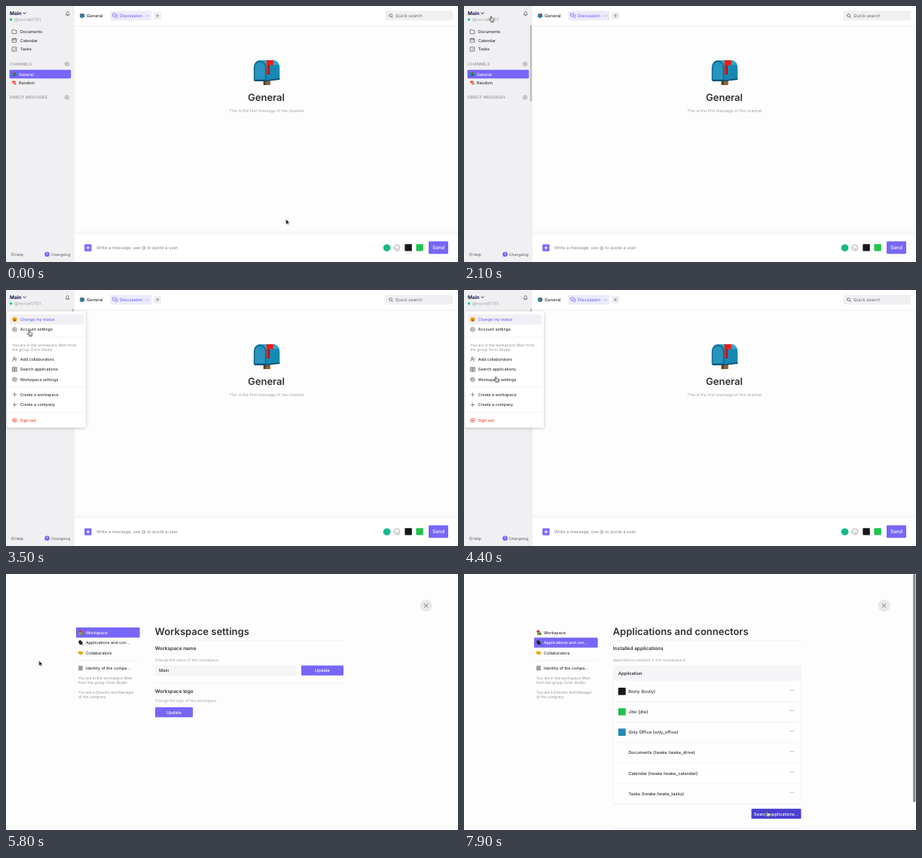
An HTML page that plays this animation: 600 by 340 pixels, repeating every 8000 ms.

```html
<!DOCTYPE html>
<html lang="en">
<head>
<meta charset="utf-8">
<title>Workspace chat</title>
<style>
html, body { margin: 0; width: 100%; height: 100%; overflow: hidden; background: #fdfdfd; }
svg { display: block; width: 600px; height: 340px; }
text { font-family: Inter, sans-serif; text-rendering: geometricPrecision; white-space: pre; }
.line { fill: none; stroke-width: .7; stroke-linecap: round; stroke-linejoin: round; }
</style>
</head>
<body>
<svg id="stage" viewBox="0 0 600 340"></svg>
<script>
const LOOP = 8000;
const INK = '#333338', GREY = '#929297', PURPLE = '#7866f8', RED = '#e8402f';
const S = 5.33, M = 5.75; // small and medium text sizes

// Text is placed by its vertical centre.
const text = (x, y, str, { size = S, fill = INK, weight = 500, anchor = 'start' } = {}) =>
  `<text x="${x}" y="${(y + size * .36).toFixed(2)}" font-size="${size}" fill="${fill}" font-weight="${weight}" text-anchor="${anchor}">${str}</text>`;
const rect = (x, y, w, h, fill, r = 0, more = '') =>
  `<rect x="${x}" y="${y}" width="${w}" height="${h}" rx="${r}" fill="${fill}" ${more}/>`;
const dot = (x, y, r, fill) => `<circle cx="${x}" cy="${y}" r="${r}" fill="${fill}"/>`;
const line = (d, stroke = INK, more = '') => `<path class="line" d="${d}" stroke="${stroke}" ${more}/>`;
const rule = (x, y, w, c = '#ececee') => rect(x, y, w, .6, c);
const ring = (x, y, r) => `M${x - r} ${y}a${r} ${r} 0 1 0 ${2 * r} 0a${r} ${r} 0 1 0 ${-2 * r} 0`;
const plus = (x, y, r) => `M${x - r} ${y}h${2 * r}M${x} ${y - r}v${2 * r}`;
const dots = (x, y, fill) => [-2, 0, 2].map(d => dot(x + d, y, .5, fill)).join('');
const group = (id, body, more = '') => `<g id="${id}" ${more}>${body}</g>`;
const at = (x, y, body, k = 1) => `<g transform="translate(${x} ${y}) scale(${k})">${body}</g>`;

const mailbox = `
  <path d="M13 24h9v11h-9z" fill="#8a6238"/><path d="M13 24h3v11h-3z" fill="#5d3d20"/>
  <path d="M8 2H27Q34.500 4 34.500 13V27L17 29.500H1V12Q1 2 8 2Z" fill="#1688b4"/>
  <path d="M8 2H27Q32 3 33.500 8L16 9Q13 3 8 2Z" fill="#35a8cf"/>
  <path d="M0 12Q0 3 8.500 3Q16.500 3 16.500 12V29H0Z" fill="#12668d"/>
  <path d="M1.500 12Q1.500 4.500 8.500 4.500Q15 4.500 15 12V27.500H1.500Z" fill="#2795bd"/>
  <path d="M1 28.500H17L34.500 26V28L17 30H1Z" fill="#0d4f70"/>
  <path d="M17 2H26V8.500H21V21H17Z" fill="#f01c14"/><path d="M21 8.500V21H19.500V8Z" fill="#a80f0b"/>`;
const mini = (x, y) => at(x, y, mailbox, .18);

const gear = (x, y) => line(ring(x, y, 2.8) + ring(x, y, 1.1), '#55555c');
const smile = (x, y) => dot(x, y, 3.3, '#f9b62c') + dot(x - 1.1, y - .8, .5, '#533') + dot(x + 1.1, y - .8, .5, '#533') +
  `<path d="M${x - 1.9} ${y + .4}h3.800q-.3 2-1.900 2t-1.900-2z" fill="#a33a20"/>`;

const sidebar = () => {
  const nav = ['Documents', 'Calendar', 'Tasks'].map((s, i) => text(19, 34 + i * 11.7, s)).join('');
  const add = y => line(ring(81, y, 2.7) + plus(81, y, 1.3), GREY);
  return rect(0, 0, 91, 340, '#f0f0f2') +
    text(5, 9.5, 'Main', { size: 6.5, weight: 700, fill: '#19194f' }) + line('M23 8.900l1.600 1.600l1.600-1.600', '#19194f', 'style="stroke-width:1"') +
    line('M79.500 11.500q.7-.6.7-2.200q0-1.800 1.500-1.800t1.500 1.800q0 1.600.7 2.200zM81 12.700h1.300', '#55555c') +
    dot(6.6, 18, 1.8, '#1fc99a') + text(11, 18.2, '@norvell7151', { size: M, fill: '#a2a2a7', weight: 400 }) + nav +
    line('M8.500 31.500h2.200l.8 1h2.500v4.200h-5.500z', '#55555c') +
    line('M8.500 43.500h5.400v4.700h-5.400zM8.500 45h5.400M10 42.600v1M12.400 42.600v1', '#55555c') +
    line('M8.500 54.700h5.400v5.400h-5.400zM9.900 57.400l1 1l1.700-1.900', '#55555c') +
    text(5, 77, 'CHANNELS', { fill: GREY }) + add(77) +
    rect(4.5, 84.8, 81.7, 11.4, PURPLE, 1.3) + mini(7.8, 87.4) + text(17, 90.6, 'General', { fill: '#fff' }) +
    rect(8.3, 99.5, 4.2, 3, RED, .6) + rect(10, 101.5, 4, 3.3, '#f3b7a5', .6) + dot(12, 103.2, .9, RED) + text(17, 102.3, 'Random') +
    text(5, 121.5, 'DIRECT MESSAGES', { fill: GREY }) + add(121.5) +
    line(ring(9, 330, 2) + 'M9 329v.4M9 330.100v.9', GREY) + text(12.2, 330, 'Help', { size: 4.92, fill: '#68686e' }) +
    dot(54.5, 329.8, 3.3, PURPLE) + text(54.5, 329.8, '!', { size: 4.5, fill: '#fff', weight: 700, anchor: 'middle' }) +
    text(60, 330, 'Changelog', { size: 4.92, fill: '#68686e' }) +
    group('sideScroll', rect(87.6, 25, 2.4, 102, '#bdbdc0', 1.2));
};

const chat = () =>
  rect(91, 0, 509, 26, '#fff') + rule(91, 26, 509) +
  mini(98, 9.8) + text(107, 13, 'General', { size: M }) +
  rect(138.5, 6.6, 54.8, 12.6, '#ecebfb', 1.3) +
  line('M141.800 10h4v3h-2.200l-1.200 1.200v-1.200h-.6zM147 11.800h.7v3h-.6v1.200l-1.200-1.200h-1.800', PURPLE) +
  text(151, 13, 'Discussion', { size: M, fill: PURPLE }) + dots(187.5, 13, PURPLE) +
  rect(196.3, 8, 9.6, 9.8, '#eeeef0', 1.2) + line(plus(201.1, 12.9, 1.8), '#77777c') +
  rect(503.5, 6.2, 89.5, 13, '#f0f0f2', 1.3) + line(ring(510.6, 12.6, 2) + 'M512.100 14.100l1.300 1.300', '#55555c') +
  text(517, 13, 'Quick search', { size: M, fill: '#6e6e74', weight: 400 }) +
  at(328.8, 70, mailbox) +
  text(345.5, 121, 'General', { size: 13, weight: 600, anchor: 'middle' }) +
  text(345.7, 139, 'This is the first message of the channel', { fill: '#a0a0a5', weight: 400, anchor: 'middle' }) +
  rect(91, 297, 509, 6.5, 'url(#rise)') + rect(91, 303.5, 509, 36.5, '#fff') +
  rect(104.2, 316.5, 9.3, 9.3, PURPLE, 1) + line(plus(108.9, 321.1, 2.2), '#fff', 'style="stroke-width:1"') +
  text(120, 321.2, 'Write a message, use @ to quote a user.', { size: M, fill: '#85858b', weight: 400 }) +
  dot(505.6, 321.2, 4.8, '#17b98c') +
  line(ring(519, 321, 3.9) + 'M517.200 322.300q1.800 1.700 3.600 0', '#88888e') + dot(517.6, 320, .5, '#88888e') + dot(520.4, 320, .5, '#88888e') +
  rect(529.4, 316.3, 9.4, 9.2, '#17171c', .8) + rect(544.4, 316.3, 9.4, 9.2, '#20c24d', 1) +
  rect(561, 312.6, 26, 16.6, PURPLE, 1.3) + text(574, 321.1, 'Send', { size: 6.5, fill: '#fff', anchor: 'middle' });

const menu = () => {
  const items = [[52.4, 'Account settings'], [92, 'Add collaborators'], [105.5, 'Search applications'], [118.8, 'Workspace settings'],
    [139, 'Create a workspace'], [152.5, 'Create a company']];
  const squares = [[8.8, 102.7], [12.1, 102.7], [8.8, 106], [12.1, 106]].map(([x, y]) => `M${x} ${y}h2.300v2.300h-2.300z`).join('');
  return rect(1.4, 28.6, 104.6, 154, '#fff', 1.5, 'filter="url(#shade)"') +
    text(18.7, 39, 'Change my status') +
    group('picked', rect(5, 32.3, 98, 13.4, '#f0f0f4', 1) + text(18.7, 39, 'Change my status', { fill: PURPLE })) + smile(11.5, 39) +
    items.map(([y, s]) => text(18.7, y, s)).join('') +
    [62.2, 128.5, 162.4].map(y => rule(1.4, y, 104.6)).join('') +
    text(8.2, 72.7, 'You are in the workspace Main from', { size: 5, fill: GREY, weight: 400 }) +
    text(8.2, 78.8, 'the group Ovrin Studio', { size: 5, fill: GREY, weight: 400 }) +
    gear(11.5, 52.4) + gear(11.5, 118.8) + line(squares, '#55555c') +
    line(ring(11, 90.5, 1.3) + 'M8.600 94.600q0-2.400 2.400-2.400t2.400 2.400M13.200 91.500h1.600', '#55555c') +
    line(plus(11.5, 139, 2.4) + plus(11.5, 152.5, 2.4), '#66666c') +
    line(ring(11.5, 173, 2.8), RED) + rect(10.5, 172, 2, 2, RED, .3) + text(18.7, 173, 'Sign out', { fill: RED });
};

// Left column of the settings, with one row selected.
const tabs = sel => {
  const ys = [77.8, 91.1, 104.6, 125];
  const rows = ['Workspace', 'Applications and con...', 'Collaborators', 'Identity of the compa...'];
  const note = (y, s) => text(96, y, s, { size: 4.95, fill: GREY, weight: 400 });
  return rect(93, ys[sel] - 6.7, 84.6, 13.3, PURPLE, 1) +
    rows.map((s, i) => text(106, ys[i], s, { fill: i === sel ? '#fff' : INK })).join('') +
    '<path d="M95.500 77l3-3l3.500 3.500z" fill="#c8432f"/>' + rect(97, 77, 4, 4, '#b98c58') + dot(101, 79.6, 1.9, '#4a9a4d') +
    '<path d="M96 89.500l2.500-2l3.500 3.500l-1.300 3l-3.200-.5z" fill="#26262e"/>' + line('M101.500 93.500l1 .9', '#26262e') +
    '<path d="M95.300 103.500l2.500-1.300l4.700 1l-.4 2.700l-3.300 1.600l-3.300-2z" fill="#f3b52f"/>' + line('M97.500 104.500l3 1.800', '#b4761c') +
    rect(96, 121.8, 6, 6.4, '#b7b0ac', .3) + line('M97.500 123.500h3M97.500 125.200h3M97.500 127h3', '#7d6f73') +
    rule(93, 114.6, 84.6) + note(138, 'You are in the workspace Main') + note(144.2, 'from the group Ovrin Studio') +
    note(156.8, 'You are a Director and Manager') + note(162.8, 'of the company.');
};

const head = s => text(197.6, 76.3, s, { size: 13, weight: 600 }) + rule(198, 88.3, 250);
const sub = (y, s) => text(197.8, y, s, { size: 6.5, weight: 600 });
const hint = (y, s) => text(197.8, y, s, { size: 4.95, fill: '#a0a0a5', weight: 400 });
const button = (x, y, w, s, id) => rect(x, y, w, 13.2, PURPLE, 1, id ? `id="${id}"` : '') +
  text(x + w / 2, y + 6.7, s, { size: M, fill: '#fff', anchor: 'middle' });

const general = () => tabs(0) + head('Workspace settings') +
  sub(98.4, 'Workspace name') + hint(114, 'Change the name of this workspace') +
  rect(198, 121.5, 188, 13.5, '#f5f5f7', 1) + text(203, 128.3, 'Main', { size: M }) + button(392, 121.5, 56, 'Update') +
  rule(198, 144, 250) + sub(156, 'Workspace logo') + hint(168, 'Change the logo of this workspace') + button(198, 177, 50, 'Update');

const apps = () => {
  const rows = ['Bozly (bozly)', 'Jitsi (jitsi)', 'Only Office (only_office)', 'Documents (twake.twake_drive)',
    'Calendar (twake.twake_calendar)', 'Tasks (twake.twake_tasks)'];
  const marks = ['#17171c', '#20c24d', '#2589b4'];
  return tabs(1) + head('Applications and connectors') +
    sub(98.4, 'Installed applications') + hint(114, 'Applications installed in this workspace 6') +
    rect(197.8, 121.5, 249.7, 183.7, '#fefefe', 0, 'stroke="#f0f0f2" stroke-width=".6"') +
    rect(198, 121.5, 249.5, 20.6, '#f5f5f7') + text(204.8, 131.9, 'Application', { size: M, weight: 600 }) +
    rows.map((s, i) => {
      const y = 156.1 + i * 27.1;
      return text(218.2, y, s, { size: M }) + dots(435.2, y - 1.6, '#66666c') + rule(198, y + 13.3, 249.5) +
        (marks[i] ? rect(204.7, y - 5, 10, 9.6, marks[i], 1) : '');
    }).join('') +
    button(381.5, 311.8, 66, 'Search applications...', 'search') + rule(198, 337, 250, '#e4e4e7') +
    rect(596.2, 0, 3.2, 303, '#88888b', 1.6);
};

const cursor = `
  <g id="arrow"><path d="M0 0V7.200L1.700 5.700L2.800 8.100L4 7.600L2.900 5.200H5.200Z" fill="#111" stroke="#fff" stroke-width=".6"/></g>
  <g id="hand"><path d="M-.7.5Q0-.4.700.500V2.800Q1.500 2.300 2 3Q2.800 2.600 3.200 3.400Q3.900 3.300 3.900 4.200L3.500 7.200H-.4L-2.500 4.600Q-2.500 3.600-1.500 4L-.7 4.700Z"
    fill="#fff" stroke="#222" stroke-width=".7" stroke-linejoin="round"/><path class="line" d="M.7 5v1.300M2 5v1.300" stroke="#222" style="stroke-width:.45"/></g>`;

document.getElementById('stage').innerHTML = `
  <defs>
    <linearGradient id="rise" x2="0" y2="1"><stop stop-color="#000" stop-opacity="0"/><stop offset="1" stop-color="#000" stop-opacity=".035"/></linearGradient>
    <filter id="shade" x="-10%" y="-10%" width="120%" height="120%"><feDropShadow dx="0" dy="1" stdDeviation="2.200" flood-opacity=".24"/></filter>
  </defs>` + rect(0, 0, 600, 340, '#fdfdfd') + sidebar() + chat() +
  group('modal', rect(0, 0, 600, 340, '#fdfdfd') + group('general', general()) + group('apps', apps()) +
    dot(557.6, 42, 8, '#e9e9eb') + line('M555.300 39.700l4.600 4.600M559.900 39.700l-4.600 4.600', '#44444a')) +
  group('menu', menu()) + group('cursor', cursor);

// Steps are [ms, value, easing towards the next step].
function play(id, prop, steps) {
  const last = steps[steps.length - 1];
  const frames = [...steps, [LOOP, last[1]]].map(([ms, value, easing = 'linear']) => ({ offset: ms / LOOP, [prop]: value, easing }));
  document.getElementById(id).animate(frames, { duration: LOOP, iterations: Infinity });
}
const HOLD = 'steps(1, end)';
const toggle = (id, first, ...times) =>
  play(id, 'opacity', [0, ...times].map((ms, i) => [ms, (i + first) % 2, HOLD]));

const GLIDE = 'cubic-bezier(.4, 0, .3, 1)';
play('cursor', 'transform', [
  [0, 371.5, 283, 'cubic-bezier(.5, 0, .8, .8)'], [900, 200, 179, 'cubic-bezier(.2, .3, .5, 1)'],
  [1700, 36, 13.5], [2850, 36, 13.5, GLIDE], [3400, 31, 53.5], [3700, 31, 53.5, GLIDE],
  [4450, 42.3, 115.3], [5750, 42.3, 115.3, GLIDE], [6350, 122.5, 94.3], [6700, 122.5, 94.3, GLIDE], [7650, 402.7, 315]
].map(([ms, x, y, ease]) => [ms, `translate(${x}px, ${y}px)`, ease]));
toggle('arrow', 1, 1600, 4900, 6200, 6800, 7600);
toggle('hand', 0, 1600, 4900, 6200, 6800, 7600);
toggle('sideScroll', 0, 1300);
toggle('picked', 1, 4700);
toggle('apps', 0, 6400);
play('menu', 'opacity', [[0, 0], [2800, 0], [2950, 1], [5200, 1], [5350, 0]]);
play('modal', 'opacity', [[0, 0], [4750, 0], [5000, 1]]);
play('general', 'opacity', [[0, 0], [5080, 0], [5400, 1], [6400, 1, HOLD], [6401, 0]]);
play('search', 'fill', [[0, PURPLE], [7600, PURPLE], [7750, '#4a3fd0']]);
</script>
</body>
</html>
```
